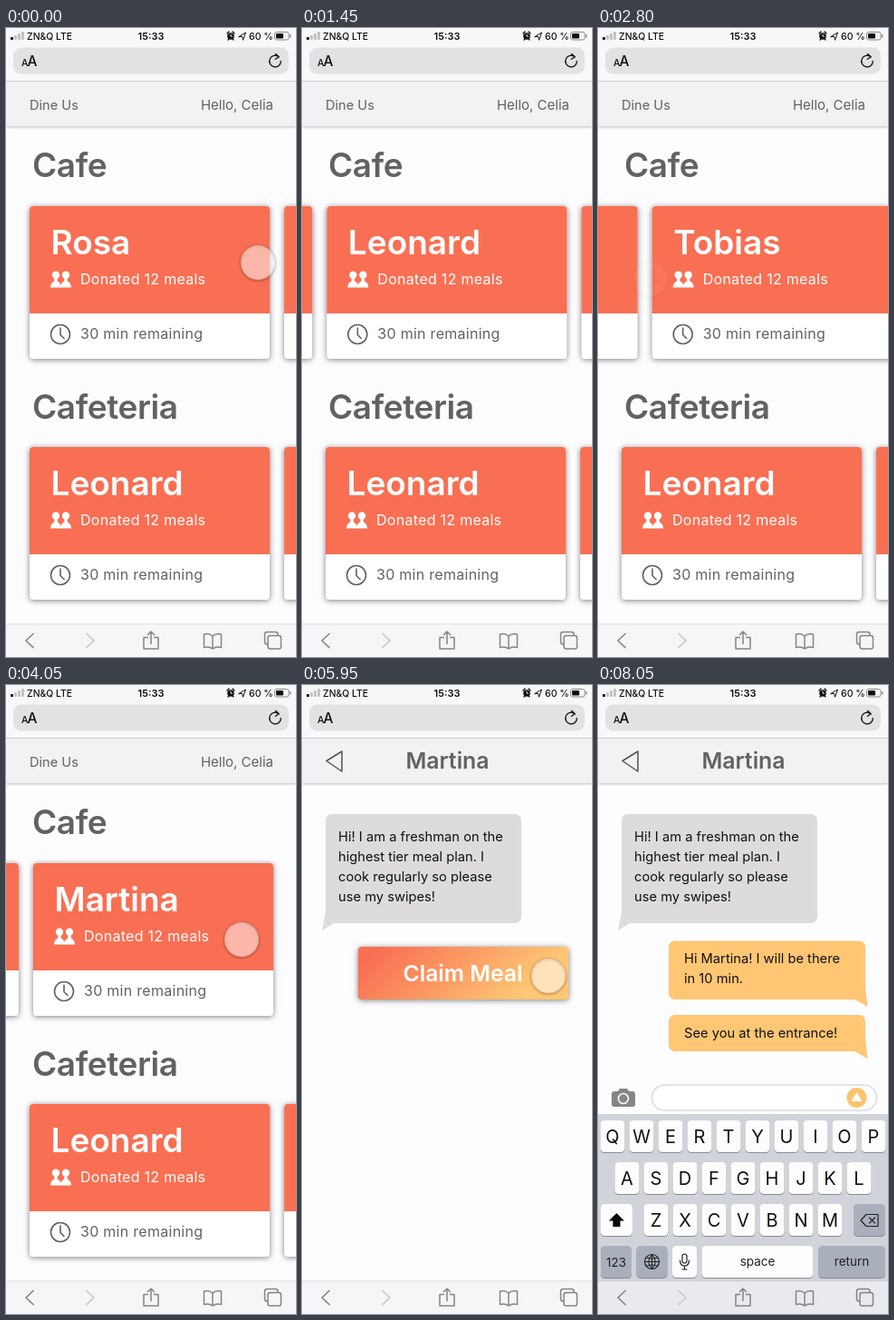
Recreate the animation shown at these times as an HTML page. Size 320 by 692 pixels, loop 8.1 s.

```html
<!DOCTYPE html>
<html lang="en">
<head>
<meta charset="utf-8">
<title>Meal sharing</title>
<style>
  html, body { margin: 0; width: 100%; height: 100%; overflow: hidden; background: #fdfcfe; }
  svg { display: block; width: 100vw; height: 100vh; font-family: Inter, Roboto, sans-serif; }
  .card { filter: drop-shadow(0 1.5px 3px rgba(0, 0, 0, .5)); }
  .key { filter: drop-shadow(0 1px 0 #898c92); }
  .soft { filter: blur(1.2px); }
  .line { fill: none; stroke-linecap: round; stroke-linejoin: round; }
</style>
</head>
<body>
<svg id="stage" viewBox="0 0 320 692" xmlns="http://www.w3.org/2000/svg"></svg>
<script>
const LOOP = 8100, PITCH = 281;
const GREY = '#626163', ORANGE = '#f96f53', YELLOW = '#ffc674', PAPER = '#fdfcfe';

const rect = (x, y, w, h, r, fill, more = '') =>
  `<rect x="${x}" y="${y}" width="${w}" height="${h}" rx="${r}" fill="${fill}" ${more}/>`;
const text = (x, y, size, str, fill, weight = 400, more = '') =>
  `<text x="${x}" y="${y}" font-size="${size}" fill="${fill}" font-weight="${weight}" ${more}>${str}</text>`;
const line = (d, color, width = 1.5) =>
  `<path class="line" d="${d}" stroke="${color}" stroke-width="${width}"/>`;
const shape = (d, fill) => `<path d="${d}" fill="${fill}"/>`;
const circle = (x, y, r, fill, more = '') =>
  `<circle cx="${x}" cy="${y}" r="${r}" fill="${fill}" ${more}/>`;
const group = (id, body) => `<g id="${id}">${body}</g>`;
const MID = 'text-anchor="middle"', END = 'text-anchor="end"';
const ROOMY = 'letter-spacing=".28"';

const person = x => circle(x, 271.8, 4.2, '#fff') +
  shape(`M${x - 6} 285.5q0-5 4.2-7l.3-4h3l.3 4q4.2 2 4.2 7z`, '#fff');

function card(x, y, name, swapName) {
  const label = (str, id) => text(49.5, 249, 37, str, '#fff', 600, id && `id="${id}"`);
  return `<g transform="translate(${x - 26} ${y - 196})">
    <g class="card">${rect(26, 196, 265, 168, 4, '#fff')}
      <path d="M26 314V200q0-4 4-4h257q4 0 4 4v114z" style="fill:var(--card)"/></g>
    ${swapName ? label(name, 'first') + label(swapName, 'second') : label(name)}
    ${person(55)}${person(66)}
    ${text(82, 282, 16, 'Donated 12 meals', '#fff', 400, ROOMY)}
    ${circle(60, 337, 10.5, 'none', `stroke="${GREY}" stroke-width="1.6"`)}
    ${line('M60 330v7.5l4 4', GREY, 1.6)}
    ${text(82, 342, 16, '30 min remaining', GREY, 400, ROOMY)}</g>`;
}

function home() {
  const row = ['Rosa', 'Leonard', 'Tobias', 'Martina']
    .map((name, i) => card(26 + i * PITCH, 196, name, i ? '' : 'Martina')).join('');
  return text(29, 164, 37, 'Cafe', GREY, 600, 'letter-spacing="-.4"') +
    text(29, 430, 37, 'Cafeteria', GREY, 600, 'letter-spacing="-.4"') +
    group('row', row) + card(26, 461, 'Leonard') + card(26 + PITCH, 461, 'Tobias') +
    text(26, 89.5, 14.6, 'Dine Us', GREY) +
    text(295, 89.5, 15, 'Hello, Celia', GREY, 400, END);
}

const lines = (x, y, rows) =>
  rows.map((s, i) => text(x, y + i * 22, 14.7, s, '#111')).join('');

const reply = (id, y, h, rows) => group(id,
  rect(78, y, 217, h, 7, YELLOW) +
  shape(`M282 ${y + h - 1}L297.5 ${y + h + 8}L295 ${y + h - 14}z`, YELLOW) +
  lines(95, y + 24.5, rows));

function chat() {
  return line('M27 83.5L44 73V95z', '#555') +
    text(160.5, 91.5, 24.8, 'Martina', GREY, 600, MID) +
    rect(26, 142, 216, 120, 7, '#dddbde') + shape('M26 250L22 270L37 261z', '#dddbde') +
    lines(40, 172, ['Hi! I am a freshman on the', 'highest tier meal plan. I',
      'cook regularly so please', 'use my swipes!']) +
    group('claim', rect(62, 288, 232, 58, 4, 'url(#warm)', 'class="card"') +
      text(177.5, 326, 24.7, 'Claim Meal', '#fff', 600, MID)) +
    reply('reply1', 281.5, 64.5, ['Hi Martina! I will be there', 'in 10 min.']) +
    reply('reply2', 363, 40, ['See you at the entrance!']);
}

function keyboard() {
  const key = (x, y, w, fill = '#fdfdfe') => rect(x, y, w, 35, 4.5, fill, 'class="key"');
  const letters = (str, row) => [...str].map((c, i) => {
    const x = 160 + (i - (str.length - 1) / 2) * 32, y = 479 + row * 46;
    return key(x - 13.5, y, 27) + text(x, y + 25, 20, c, '#111', 400, MID);
  }).join('');
  const dark = '#a9b0bc', ink = '#222';
  return rect(0, 438, 320, 34, 0, PAPER) +
    rect(15, 447, 26, 17, 3, '#858587') + shape('M21 448l3-4h8l3 4z', '#858587') +
    circle(28, 455, 5.5, '#858587', 'stroke="#fff" stroke-width="1.6"') +
    rect(59.5, 440, 248, 28, 14, '#fff', 'stroke="#dcdcdf" stroke-width="1.6"') +
    circle(285.5, 454, 11, '#fdc36d') + shape('M285.5 448l6 10h-12z', '#fff') +
    rect(0, 472, 320, 184, 0, '#d0d3da') +
    ['QWERTYUIOP', 'ASDFGHJKL', 'ZXCVBNM'].map(letters).join('') +
    key(3, 571, 35) + shape('M20.5 581l8.500 8.500h-4.500v6.500h-8v-6.500h-4.500z'.replaceAll('00', ''), '#000') +
    key(282, 571, 35, dark) +
    line('M290 589l6-6.5h13v13h-13zM299.5 586l6 6m0-6l-6 6', ink, 1.2) +
    key(3, 617, 34, dark) + text(20, 639.5, 13.5, '123', ink, 400, MID) +
    key(42.5, 617, 34, dark) + circle(59.5, 634.5, 8, 'none', `stroke="${ink}" stroke-width="1.2"`) +
    line('M51.5 634.5h16M59.5 626.5v16q-7.5-8 0-16q7.5 8 0 16M53 630q6.5 2.5 13 0M53 639q6.5-2.5 13 0', ink, 1) +
    key(82, 617, 27) + rect(93, 626, 5, 10, 2.5, 'none', `stroke="${ink}" stroke-width="1.2"`) +
    line('M90.5 633q0 6 5 6t5-6M95.5 639v4M93 643h5', ink, 1.2) +
    key(114.5, 617, 123) + text(176, 639, 13.5, 'space', ink, 400, MID) +
    key(243, 617, 74, dark) + text(280, 639, 13.5, 'return', ink, 400, MID);
}

function topBar() {
  let bars = '';
  for (let i = 0; i < 4; i++) {
    bars += rect(5 + i * 4, 10 - i * 2, 3, 3 + i * 2, .8, i ? '#c3c3c5' : '#111');
  }
  return rect(0, 0, 320, 58, 0, '#f8f7f9') + rect(0, 58, 320, 1, 0, '#cfced1') + bars +
    text(23, 12.5, 10.4, 'ZN&amp;Q LTE', '#111', 500) +
    text(160, 12.5, 11, '15:33', '#111', 600, MID) +
    circle(248, 9, 3.8, '#111') + line('M244 6l2-2M252 6l-2-2M245 13l1-1M251 13l-1-1', '#111', 1.3) +
    line('M248 7v2.2h1.5', '#f8f7f9', .9) +
    line('M257 9.5l7.5-4.5-3 8.3-.8-3.5z', '#111', 1) +
    text(268, 12.5, 10.6, '60 %', '#111', 500) +
    rect(296.5, 4.5, 15.5, 8.5, 2.3, 'none', 'stroke="#888"') +
    rect(298, 6, 8, 5.5, 1, '#111') + rect(313, 7, 1.4, 3.5, .7, '#888') +
    rect(8, 21.5, 304, 29, 9, '#e2e1e4') +
    text(17, 41.5, 10.5, 'A', '#111', 500) + text(23.5, 41.5, 15.5, 'A', '#111', 500) +
    line('M301 31.7A6.3 6.3 0 1 0 303.3 36.5M297.5 28.5l3.8 3.2-4 2.6', '#111', 1.3);
}

function bottomBar() {
  const c = '#858588';
  return rect(0, 656, 320, 36, 0, 'var(--bar)') + rect(0, 655.5, 320, .7, 0, '#d2d2d5') +
    line('M30 666.5l-8 7.5 8 7.5', c, 1.7) + line('M89 666.5l8 7.5-8 7.5', '#c9c9cc', 1.7) +
    line('M156.5 670.5h-4.5v12.5h16v-12.5h-4.5M160 677.5v-13.5m-3.5 3.5l3.5-3.5 3.5 3.5', c) +
    line('M228 669q-4-3.5-9.5-2v14.5q5.5-1.5 9.5 1.5q4-3 9.5-1.5v-14.5q-5.5-1.5-9.5 2v14', c) +
    line('M289 678h-1q-2.5 0-2.5-2.5v-8.5q0-2.5 2.5-2.5h9.5q2.5 0 2.5 2.5v1', c) +
    rect(289, 668.5, 14.5, 14.5, 2.5, 'none', `stroke="${c}" stroke-width="1.5"`);
}

const stage = document.getElementById('stage');
stage.innerHTML = `
  <defs>
    <linearGradient id="warm" x2="1" y2=".25">
      <stop offset=".1" stop-color="${ORANGE}"/><stop offset=".95" stop-color="#fdc774"/></linearGradient>
    <radialGradient id="glow">
      <stop offset="0" stop-color="#fff" stop-opacity=".04"/>
      <stop offset=".55" stop-color="#fff" stop-opacity=".24"/>
      <stop offset="1" stop-color="#fff" stop-opacity=".42"/></radialGradient>
  </defs>
  ${rect(0, 0, 320, 692, 0, PAPER)}
  ${rect(0, 59, 320, 49, 0, '#f2f1f3', 'style="filter:drop-shadow(0 1px 1.5px rgba(0,0,0,.25))"')}
  ${group('home', home())}${group('chat', chat())}${group('keys', keyboard())}
  ${topBar()}${bottomBar()}
  ${group('touch', circle(0, .8, 19, 'none', 'class="soft" stroke="#000" stroke-opacity=".25" stroke-width="2"') +
    circle(0, 0, 19, '#fff', 'id="flat"') +
    circle(0, 0, 18.6, 'url(#glow)', 'id="press" stroke="#fff" stroke-opacity=".3"'))}`;

const clamp = v => Math.max(0, Math.min(1, v));
const ramp = (t, from, span) => clamp((t - from) / span);
const easeOut = (t, from, span) => 1 - (1 - ramp(t, from, span)) ** 3;
const mix = (a, b, u) => a + (b - a) * u;
const blend = (a, b, u) => `color-mix(in srgb, ${a}, ${b} ${u * 100}%)`;
const $ = id => document.getElementById(id);
const alpha = (id, v) => $(id).setAttribute('opacity', v);
const move = (id, x, y) => $(id).setAttribute('transform', `translate(${x} ${y})`);

const SWIPES = [605, 2200, 3150], DRAG = 500, HOVER = 300, STEP = 839 / 3;
const TAP = { from: 3800, open: 4150, claim: 6150 };

// Cards lag behind the finger, then glide to rest after release.
const swiped = (t, start) =>
  mix(.62 * ramp(t, start, DRAG) ** 1.3, 1, easeOut(t, start + DRAG, 300));

function finger(t) {
  if (t >= TAP.from) {
    const u = ramp(t, 4700, 1250);
    return {
      x: mix(260, 272, u), y: mix(280, 320, u), press: 0,
      shown: ramp(t, TAP.from, 100) - ramp(t, TAP.claim, 120)
    };
  }
  const start = SWIPES.find(s => t < s + DRAG + 150) ?? SWIPES.at(-1);
  const near = ramp(t, start - HOVER, HOVER), u = ramp(t, start, DRAG);
  return {
    x: mix(278, 268, near) - 210 * u, y: mix(258, 275, near) + u,
    press: ramp(t, start - 100, 150),
    shown: (start === SWIPES[0] ? 1 : ramp(t, start - HOVER, 100)) - ramp(t, start + DRAG, 120)
  };
}

function draw(t) {
  const steps = SWIPES.map(s => swiped(t, s));
  const open = easeOut(t, TAP.open, 590);
  const claim = easeOut(t, TAP.claim + 50, 500);
  const sent = easeOut(t, 7250, 350);
  const touch = finger(t);

  move('row', -STEP * steps.reduce((a, b) => a + b), 0);
  alpha('first', 1 - steps[0]);
  alpha('second', steps[0]);
  alpha('home', 1 - open);
  stage.style.setProperty('--card', blend(ORANGE, '#fbd493', open));
  stage.style.setProperty('--bar', blend('#f6f6f8', '#e9eaed', claim));

  alpha('chat', clamp(open * 1.08));
  alpha('claim', 1 - claim);
  alpha('reply1', claim);
  move('reply1', 0, 7 * (1 - claim));
  alpha('reply2', sent);
  move('reply2', 0, 40 * (1 - sent));
  move('keys', 0, 220 * (1 - claim));

  move('touch', touch.x, touch.y);
  alpha('touch', touch.shown);
  alpha('flat', .5 * (1 - touch.press));
  alpha('press', touch.press);
}

const start = performance.now();
(function frame() {
  draw((performance.now() - start) % LOOP);
  requestAnimationFrame(frame);
})();
</script>
</body>
</html>
```
